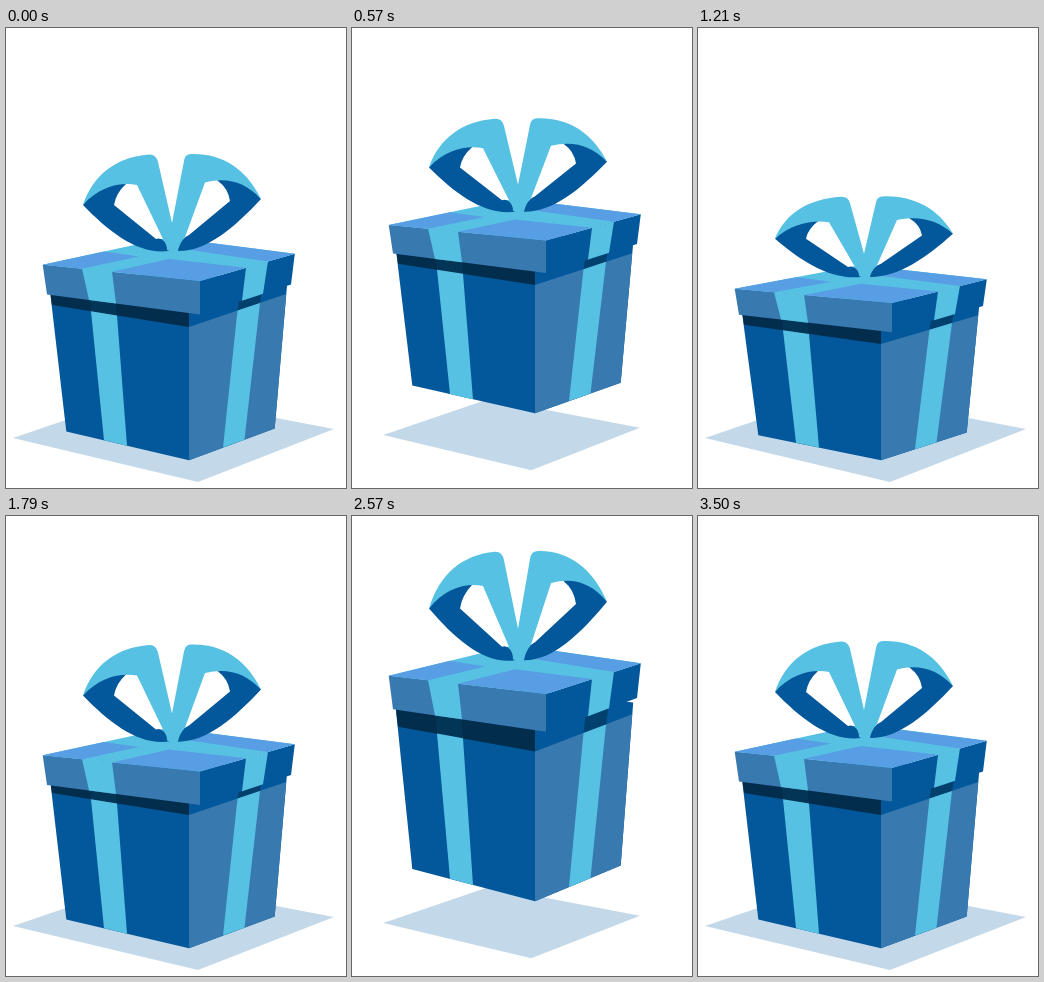
Animation, 340 px wide and 460 px high, one loop 3.57 s. Source, as an HTML page without scripts:

```html
<!DOCTYPE html>
<html lang="en">
<head>
<meta charset="utf-8">
<title>Jumping gift box</title>
<style>
html, body { margin: 0; width: 100%; height: 100%; overflow: hidden; background: #fff; }
svg { display: block; width: 340px; height: 460px; }

.navy { fill: #03579b; }
.steel { fill: #3879b0; }
.sky { fill: #579ee4; }
.ribbon { fill: #56c1e2; }
.band { fill: #022d4d; }
.band-ribbon { fill: #023556; }
.side-ribbon { fill: #02416e; }
.ground { fill: #c3d8e9; }

/* 50 drawings per loop, 2% each */
.shadow, .jump, .squash, .lid, .bow { animation: 3570ms steps(1) -5ms infinite; }
.shadow { animation-name: shadow; transform-origin: 128px 395px; }
.jump { animation-name: jump; }
.squash { animation-name: squash; transform-origin: 183px 432px; }
.lid { animation-name: lid; }
.bow { animation-name: bow; transform-origin: 168px 224px; }

@keyframes jump {
  0%, 10%, 62% { translate: 0 0; }
  12%, 64% { translate: 0 -8px; }
  14%, 66% { translate: 0 -30px; }
  16%, 68% { translate: 0 -47px; }
  26%, 78% { translate: 0 -36px; }
  28%, 80% { translate: 0 -12px; }
  30%, 82%, 100% { translate: 0 0; }
}
@keyframes shadow {
  0%, 10%, 62% { scale: 1; }
  12%, 64% { scale: .966; }
  14%, 66% { scale: .872; }
  16%, 68% { scale: .8; }
  26%, 78% { scale: .847; }
  28%, 80% { scale: .949; }
  30%, 82%, 100% { scale: 1; }
}
@keyframes squash {
  0% { scale: 1 1; }
  2%, 54% { scale: 1 1; animation-timing-function: steps(4); }
  10%, 62% { scale: 1 .86; }
  12%, 64% { scale: 1 .865; }
  14%, 66% { scale: 1 .89; }
  16%, 68% { scale: 1 .963; }
  18%, 70% { scale: 1 1.016; }
  20%, 72% { scale: 1 1.125; }
  22%, 74% { scale: 1 1.19; }
  24%, 76% { scale: 1 1.21; }
  26%, 78% { scale: 1 1.18; }
  28%, 80% { scale: 1 1.08; }
  30%, 82% { scale: 1 .95; }
  32%, 84% { scale: 1 .86; }
  34% { scale: 1 .872; }
  86% { scale: 1 .888; }
  36%, 88% { scale: 1 .945; }
  38%, 90% { scale: 1 1; }
  40%, 92% { scale: 1 1.02; }
  42%, 94% { scale: 1 1.01; }
  44%, 96%, 100% { scale: 1 1; }
}
@keyframes lid {
  0%, 16%, 54%, 68% { translate: 0 0; }
  18%, 70% { translate: 0 -1px; }
  20%, 72% { translate: 0 -5px; animation-timing-function: steps(2); }
  24%, 76% { translate: 0 -10px; animation-timing-function: steps(4); }
  32%, 84% { translate: 0 -1px; }
  34%, 86% { translate: 0 -1px; animation-timing-function: steps(3); }
  40%, 92% { translate: 0 -6px; animation-timing-function: steps(3); }
  46% { translate: 0 -1px; animation-timing-function: steps(2); }
  50% { translate: 0 2.6px; animation-timing-function: steps(2); }
  98% { translate: 0 -1px; }
  100% { translate: 0 0; }
}
@keyframes bow {
  0% { scale: 1 1; }
  2%, 54% { scale: 1 1; animation-timing-function: steps(4); }
  10%, 62% { scale: 1 .95; animation-timing-function: steps(3); }
  16%, 68% { scale: 1 1; }
  28%, 80% { scale: 1 1.02; animation-timing-function: steps(2); }
  32%, 84% { scale: 1 .95; }
  34%, 86% { scale: 1 .952; animation-timing-function: steps(3); }
  40%, 92%, 100% { scale: 1 1; }
}
</style>
</head>
<body>
<svg viewBox="0 0 340 460">
  <path class="shadow ground" d="M7 410 139 365 328 401 192 454Z"/>
  <g class="jump"><g class="squash">
    <!-- body -->
    <path class="navy" d="M42.500 250 183 245 281.200 255.500 268.700 400.500 183 432.200 60.300 403.500Z"/>
    <path class="steel" d="M183 299 280.200 266 268.700 400.500 183 432.200Z"/>
    <path class="band" d="M42.500 250 183 270V299L46 277Z"/>
    <path class="band-ribbon" d="M82 255 109 259 111 287.400 85 283.200Z"/>
    <path class="side-ribbon" d="M234 264 257 256 254 275 231.500 282.600Z"/>
    <path class="ribbon" d="M85 283.200 111 287.400 121 417.700 98 412.300ZM231.500 282.600 254 275 238.500 411.700 217 419.600Z"/>

    <g class="lid">
      <path class="navy" d="M36.700 236.700 194 253 288.800 225.700 285 256.500 194 286.500Z"/>
      <path class="steel" d="M36.700 236.700 194 253V286.500L41 266.500Z"/>
      <path class="ribbon" d="M36.700 236.700 163 209.500 288.800 225.700 194 253Z"/>
      <path class="sky" d="M36.700 236.700 98 223.500 133 228.500 76 240.700ZM106 243.800 163 231 240 239.700 194 253ZM203 214.700 288.800 225.700 262 233.400 184 222Z"/>
      <path class="ribbon" d="M76 240.500 106 243.600 110 275.500 83 272ZM240 239.700 262 233.300 257 265.700 236 272.700Z"/>

      <g class="bow">
        <path class="navy" d="M77 177C90 158 108 150 122 152L120 156Q110 165 108 177L150 211Q158 208 163 223C133 227 104 205 77 177Z"/>
        <path class="navy" d="M255 171C241 153 224 147 210 150L212 153Q222 160 224 173L183 207Q175 210 171 223C200 224 228 200 255 171Z"/>
        <path class="ribbon" d="M77 177C87 147 110 129 143 126.500Q150 126 152 134L166 195 178 133Q179 126 185 126C215 125 240 140 255 171C239 154 221 149 199 154.500L179 209Q173 216 172 223Q167 225 161 222Q161 216 157 211L131 157C115 154 94 158 77 177Z"/>
      </g>
    </g>
  </g></g>
</svg>
</body>
</html>
```
